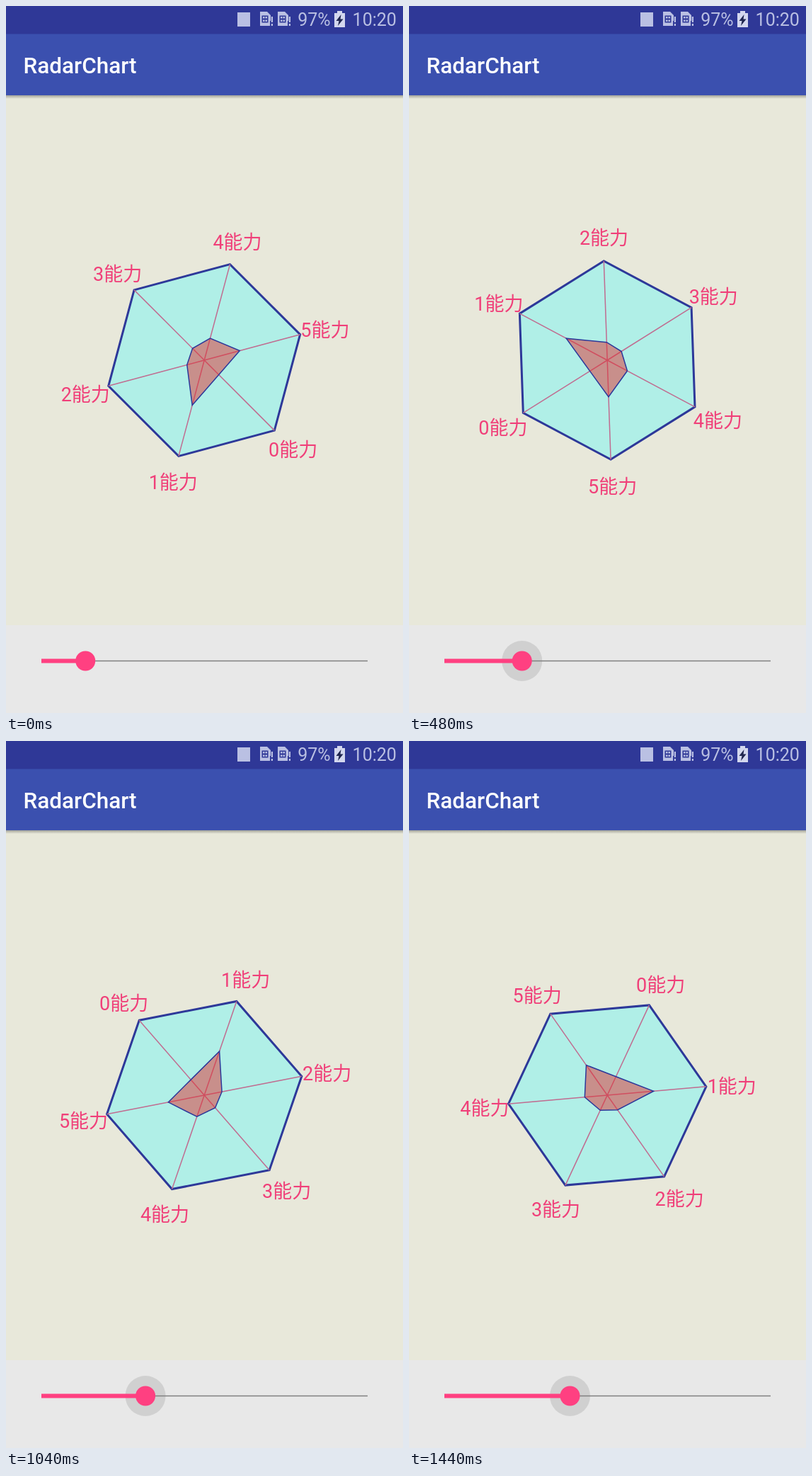
These frames come from a looping animation (561x998 px, 1.52 s). An HTML page:

```html
<!DOCTYPE html>
<html lang="zh-CN">
<head>
<meta charset="utf-8">
<title>RadarChart</title>
<style>
  html, body { margin: 0; width: 100%; height: 100%; overflow: hidden; background: #e8e8da; }
  svg { display: block; width: 100vw; height: 100vh; }
  text { font-family: Roboto, "Noto Sans CJK SC", "Noto Sans CJK", sans-serif; }
  .status { font-size: 25px; fill: #bac0e3; }
  .title { font-size: 31.5px; font-weight: 500; fill: #fff; }
  .label { font-size: 27px; fill: #f03f79; text-anchor: middle; }
  .web { fill: #b0efe7; stroke: #2d3899; stroke-width: 3; }
  .spoke { stroke: #c06c90; stroke-width: 1.5; }
  .data { fill: rgba(226, 49, 49, .5); stroke: #2d3899; stroke-width: 1.5; }
</style>
</head>
<body>
<svg viewBox="0 0 561 998">
  <defs>
    <linearGradient id="shade" x2="0" y2="1">
      <stop offset="0" stop-color="#000" stop-opacity=".3"/>
      <stop offset="1" stop-color="#000" stop-opacity="0"/>
    </linearGradient>
    <g id="sim" fill="#bac0e3">
      <path fill-rule="evenodd" d="M0 0H10L15 5V13H14V20H0ZM2.500 5.500V15.500H11.500V5.500ZM4 7H6.500V9.500H4ZM7.500 7H10V9.500H7.500ZM4 11.500H6.500V14H4ZM7.500 11.500H10V14H7.500Z"/>
      <path d="M15.800 7H18V15H15.800ZM15.800 17H18V20H15.800Z"/>
    </g>
  </defs>

  <rect width="561" height="998" fill="#e8e8da"/>
  <rect y="126" width="561" height="5" fill="url(#shade)"/>
  <rect y="39" width="561" height="87" fill="#3b50af"/>
  <rect width="561" height="39.500" fill="#2f3897"/>
  <rect x="327" y="9" width="18" height="20" fill="#bac0e3"/>
  <use href="#sim" x="359" y="8"/>
  <use href="#sim" x="384" y="8"/>
  <text class="status" x="412.200" y="28.300">97%</text>
  <path d="M468 7H475V10H479V30H464V10H468Z" fill="#d3d7ee"/>
  <path d="M473.500 12L466.500 21H470.500L469 28L476.500 18.500H472.500Z" fill="#20264f"/>
  <text class="status" x="489.600" y="28.300">10:20</text>
  <text class="title" x="24.500" y="95">RadarChart</text>

  <g id="chart"></g>

  <rect y="874" width="561" height="124" fill="#e8e8e8"/>
  <circle id="halo" cy="924.500"/>
  <circle id="wave" cy="924.500" fill-opacity=".03"/>
  <path d="M50 924.500H511" stroke="#808080" stroke-width="1.400"/>
  <rect id="bar" x="50" y="921.500" height="6" fill="#ff4081"/>
  <circle id="thumb" cy="924.500" r="14" fill="#ff4081"/>
</svg>
<script>
const STEP = 80, LOOP = 1520;
const CX = 280.2, CY = 500, R = 140.2, LABEL_R = 175.3;
const VALUES = [29, 65.7, 25.3, 23.5, 32, 51.8];
// Slider position at each step; one unit turns the chart by one degree.
const PROGRESS = [135, 164, 187, 203, 215, 227, 238, 248, 258, 268,
                  279, 291, 305, 319, 331, 343, 356, 370, 385];

const $ = id => document.getElementById(id);
const set = (el, attrs) => {
  for (const k in attrs) el.setAttribute(k, attrs[k]);
};
const add = (tag, cls) => {
  const el = document.createElementNS('http://www.w3.org/2000/svg', tag);
  el.setAttribute('class', cls);
  return $('chart').appendChild(el);
};

const web = add('polygon', 'web');
const spokes = VALUES.map(() => add('line', 'spoke'));
const data = add('polygon', 'data');
const labels = VALUES.map((_, i) => {
  const el = add('text', 'label');
  el.textContent = i + '能力';
  return el;
});

function drawChart(turn) {
  const at = (i, r) => {
    const a = (turn - 90 + 60 * i) * Math.PI / 180;
    return [CX + r * Math.cos(a), CY + r * Math.sin(a)];
  };
  set(web, { points: VALUES.map((_, i) => at(i, R)).join(' ') });
  set(data, { points: VALUES.map((v, i) => at(i, v)).join(' ') });
  VALUES.forEach((_, i) => {
    const [x2, y2] = at(i, R), [x, y] = at(i, LABEL_R);
    set(spokes[i], { x1: CX, y1: CY, x2, y2 });
    set(labels[i], { x: x + 1.4, y: y + 12.4 });
  });
}

function drawSlider(progress, step) {
  const cx = 50 + progress * 0.461;
  set($('bar'), { width: cx - 50 });
  set($('thumb'), { cx });
  // The press ripple grows over the first few steps.
  set($('halo'), { cx, r: Math.min(28.5, 24 + 1.5 * step), 'fill-opacity': Math.min(0.075, 0.0175 * step) });
  set($('wave'), { cx, r: Math.min(28.5, 11 * step) });
}

let shown = -1;
function tick() {
  const step = Math.floor(performance.now() % LOOP / STEP);
  if (step !== shown) {
    shown = step;
    drawChart(PROGRESS[step]);
    drawSlider(PROGRESS[step], step);
  }
  requestAnimationFrame(tick);
}
tick();
</script>
</body>
</html>
```
